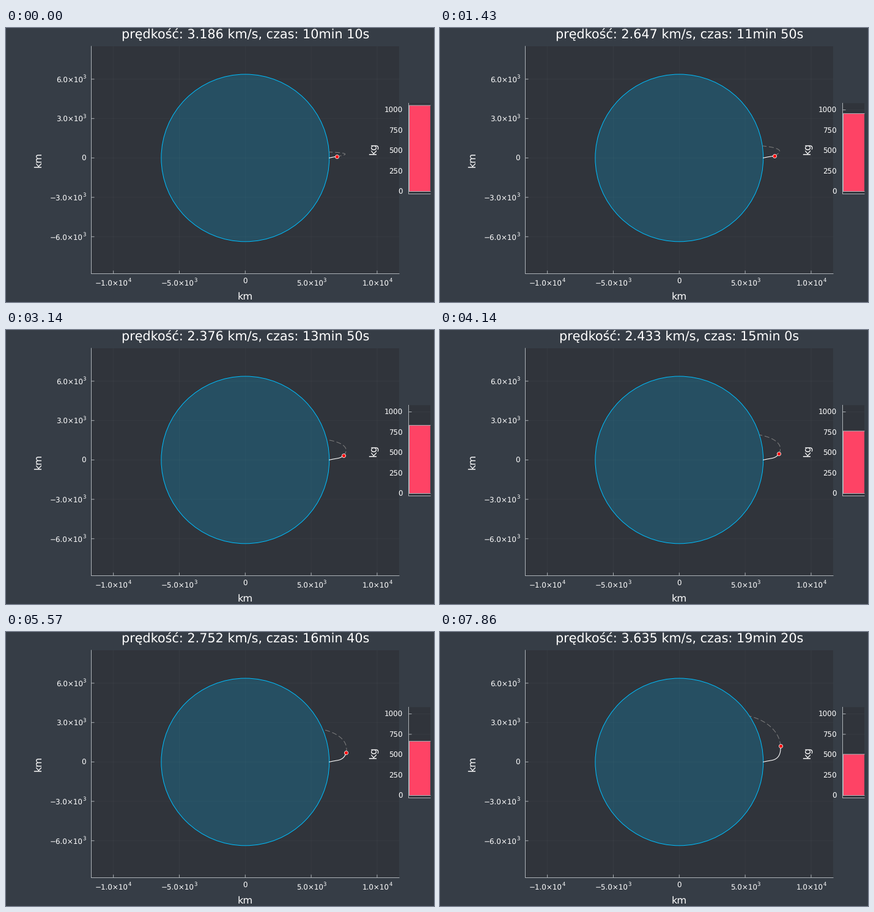
Animation of 700x450 px, one loop 8000 ms. Source, as a matplotlib script:

```python
import numpy as np
import matplotlib.pyplot as plt
from matplotlib.animation import FuncAnimation
from matplotlib.patches import Circle, Rectangle

W, H, DPI = 700, 450, 100
STEPS, STEP = 56, 10               # flight steps and seconds in each
FRAMES, INTERVAL = 200, 40
PT = 72 / DPI                      # points per pixel
KM = 46.37                         # kilometres per pixel
CX, CY = 391.3, 213.4              # centre of the planet on the stage
RADIUS, GM = 6371.0, 398600.0

BG, INSIDE, AXIS = "#363D46", "#30343B", "#ADB2B7"
SKY, PINK = "#00BFFF", "#FE4365"
TICK, GUIDE, TITLE = 11.9, 16.3, 20.8
EM = {"−": 0.838, "×": 0.838, ".": 0.318}
RAISED = 0.72                      # relative size of exponents

# Lines are placed on pixel centres, so snapping is off.
plt.rcParams.update({"font.family": "DejaVu Sans", "path.snap": False,
                     "text.hinting": "none"})
fig = plt.figure(figsize=(W / DPI, H / DPI), dpi=DPI, facecolor=BG)
ax = fig.add_axes([0, 0, 1, 1])
ax.set_xlim(0, W)
ax.set_ylim(H, 0)
ax.axis("off")


def line(xs, ys, color=AXIS, width=1.0, **kw):
    return ax.plot(xs, ys, color=color, lw=width * PT, **kw)[0]


def text(x, y, s, size, ha="center", va="baseline", **kw):
    return ax.text(x, y, s, fontsize=size * PT, color="white", ha=ha, va=va,
                   **kw)


def box(x, y, w, h, **kw):
    return ax.add_patch(Rectangle((x, y), w, h, **kw))


def power_label(right, y, base, power):
    """Right-aligned number with a raised exponent."""
    text(right, y - 6.5, power, TICK * RAISED, ha="right")
    text(right - 0.6 * RAISED * TICK, y, base, TICK, ha="right")


def power_width(base):
    return TICK * (sum(EM.get(c, 0.636) for c in base) + 0.6 * RAISED)


def draw_map():
    left, right, top, bottom = 139.5, 643, 30, 403.5
    box(left, top, right - left, bottom - top, fc=INSIDE, lw=0, zorder=0)
    for i in range(-2, 3):
        x, y = CX + i * 5000 / KM, CY - i * 3000 / KM
        grid = dict(color="white", width=0.8, alpha=0.04, zorder=1)
        line([x, x], [top, bottom], **grid)
        line([left, right], [y, y], **grid)
        line([x, x], [bottom, bottom - 4.5], zorder=2)
        line([left, left + 4.5], [y, y], zorder=2)
        if i == 0:
            text(x, 419.5, "0", TICK)
            text(130.5, y + 4.4, "0", TICK, ha="right")
            continue
        sign = "−" if i < 0 else ""
        far = abs(i) == 2
        base = sign + ("1.0×10" if far else "5.0×10")
        power_label(x + power_width(base) / 2, 423.5, base, "4" if far else "3")
        power_label(131, y + 5.6, f"{sign}{3 * abs(i)}.0×10", "3")
    line([left, left], [top, bottom], zorder=2)
    line([left, right], [bottom, bottom], zorder=2)
    text(CX, 445.5, "km", GUIDE)
    text(60.5, 216.5, "km", GUIDE, ha="right", va="center", rotation=90)
    disc = dict(radius=RADIUS / KM, zorder=3)
    ax.add_patch(Circle((CX, CY), fc=SKY, alpha=0.2, lw=0, **disc))
    ax.add_patch(Circle((CX, CY), fc="none", ec=SKY, lw=PT, **disc))


def bar_y(kg):
    return 268.5 - 0.134 * kg


def draw_gauge():
    left, right, top, bottom = 658.5, 694, 123.5, 272.5
    box(left, top, right - left, bottom - top, fc=INSIDE, lw=0, zorder=0)
    for kg in range(0, 1001, 250):
        y = bar_y(kg)
        line([left, right], [y, y], color="white", width=0.8, alpha=0.04,
             zorder=1)
        line([left, left + 4.5], [y, y], zorder=2)
        text(649, y + 4.4, str(kg), TICK, ha="right")
    line([left, left], [top, bottom], zorder=2)
    line([left, right], [bottom, bottom], zorder=2)
    text(609, 198, "kg", GUIDE, ha="right", va="center", rotation=90)


# Speed and heading as smooth curves through a few readings.
KNOTS = np.array([0, 10, 22, 29, 39, 46, 55]) / 55
SPEEDS = np.array([3.186, 2.647, 2.376, 2.433, 2.752, 3.097, 3.635])
HEADINGS = [0.145, 0.383, 0.791, 1.034, 1.327, 1.480, 1.640]
speed_fit = np.polyfit(KNOTS, SPEEDS ** 2, 6)
heading_fit = np.polyfit(KNOTS, HEADINGS, 4)

SUB = 10
u = np.linspace(0, 1, (STEPS - 1) * SUB + 1)
speed = np.sqrt(np.polyval(speed_fit, u))
heading = np.polyval(heading_fit, u)
vel = np.column_stack([speed * np.cos(heading), speed * np.sin(heading)])
moves = (vel[1:] + vel[:-1]) / 2 * STEP / SUB
start = np.array([540.6 - CX, CY - 211.1]) * KM
flight = start + np.vstack([[0, 0], np.cumsum(moves, axis=0)])


def stage(points):
    points = np.asarray(points)
    return CX + points[:, 0] / KM, CY - points[:, 1] / KM


def coast(pos, v, dt=4.0):
    """Free fall from here until the ground is reached."""
    path = [pos]
    for _ in range(1500):
        v = v - GM * pos / np.hypot(*pos) ** 3 * dt / 2
        pos = pos + v * dt
        v = v - GM * pos / np.hypot(*pos) ** 3 * dt / 2
        path.append(pos)
        if np.hypot(*pos) < RADIUS:
            break
    return path


# Climb before the loop begins: a shallow arc from the ground.
s = np.linspace(0, 1, 20)
x0, y0 = stage(flight[:1])
climb_x = (1 - s) ** 2 * 528.8 + 2 * s * (1 - s) * 535 + s ** 2 * x0[0]
climb_y = (1 - s) ** 2 * 213.4 + 2 * s * (1 - s) * 211.9 + s ** 2 * y0[0]

draw_map()
draw_gauge()
title = text(391.5, 18, "", TITLE)
forecast = line([], [], color="#808080", zorder=4, dash_capstyle="butt")
forecast.set_dashes([8, 4])
trail = line([], [], color="white", width=1.1, zorder=5)
craft = ax.plot([], [], "o", ms=6 * PT, mfc="red", mec="white", mew=0.8 * PT,
                zorder=6)[0]
fuel = box(659.5, 0, 34.5, 0, fc=PINK, lw=0, zorder=3)
fuel_edge = line([], [], zorder=4)


def update(frame):
    k = min((frame + 1) * STEPS // FRAMES, STEPS - 1)
    i = k * SUB
    minutes, seconds = divmod(610 + STEP * k, 60)
    title.set_text(f"prędkość: {round(float(speed[i]), 3)} km/s, "
                   f"czas: {minutes}min {seconds}s")
    xs, ys = stage(flight[:i + 1])
    trail.set_data(np.r_[climb_x, xs], np.r_[climb_y, ys])
    craft.set_data(xs[-1:], ys[-1:])
    forecast.set_data(*stage(coast(flight[i], vel[i])))

    top, base = bar_y(1055 - STEP * k), bar_y(0)
    fuel.set_y(top)
    fuel.set_height(base - top)
    fuel_edge.set_data([694, 659.5, 659.5, 694], [top, top, base, base])
    return title, trail, craft, forecast, fuel, fuel_edge


anim = FuncAnimation(fig, update, frames=FRAMES, interval=INTERVAL,
                     init_func=lambda: update(0), repeat=True, blit=False)
plt.show()
```
